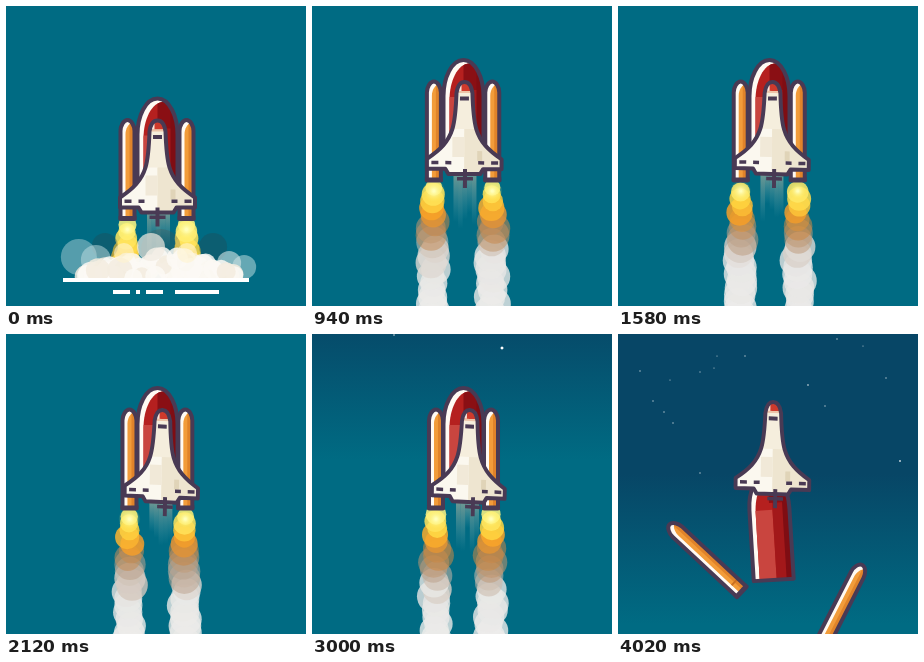
These frames come from a looping animation (300x300 px, 4040 ms). An HTML page with a canvas:

```html
<!DOCTYPE html>
<html lang="en">
<head>
<meta charset="utf-8">
<title>Shuttle launch</title>
<style>
html, body { margin: 0; width: 100%; height: 100%; overflow: hidden; background: #006b83; }
canvas { display: block; width: 100vw; height: 100vh; }
</style>
</head>
<body>
<canvas id="stage" width="300" height="300"></canvas>
<script>
const ctx = document.getElementById('stage').getContext('2d');
const LOOP = 4040, SPLIT = 3170, CUTOFF = 3130;
const INK = '#493a54';

const clamp = (v, a = 0, b = 1) => Math.min(b, Math.max(a, v));
const mix = (a, b, k) => a + (b - a) * k;
const ramp = (t, a, b) => clamp((t - a) / (b - a));
const easeInOut = k => k < .5 ? 2 * k * k : 1 - 2 * (1 - k) * (1 - k);
const rand = n => { const s = Math.sin(n * 127.1 + 11.7) * 43758.5453; return s - Math.floor(s); };

// Motion
const lift = t => 38.5 * (1 - easeInOut(ramp(t, 0, 560)));
const roll = t => Math.pow((1 - Math.cos(Math.PI * Math.max(t, 0) / 2900)) / 2, 1.3);
const groundY = t => 274 + 130 * Math.pow(t / 700, 2);
const nozzleX = (side, t) => side < 0 ? 121.5 + 2.5 * roll(t) : 180.5 - 1.5 * roll(t);

function disc(x, y, r, color, alpha = 1) {
  ctx.globalAlpha = alpha;
  ctx.fillStyle = color;
  ctx.beginPath();
  ctx.arc(x, y, r, 0, 7);
  ctx.fill();
  ctx.globalAlpha = 1;
}

function box(x, y, w, h, color) {
  ctx.fillStyle = color;
  ctx.fillRect(x, y, w, h);
}

// Bands of colour inside an inked outline, with a white rim along the left
function shape(path, bands, rim) {
  ctx.save();
  ctx.clip(path);
  ctx.fillStyle = '#fffaf3';
  ctx.fill(path);
  ctx.translate(rim, rim * .6);
  ctx.beginPath();
  ctx.clip(path);
  ctx.translate(-rim, -rim * .6);
  bands.forEach(b => box(...b));
  ctx.restore();
  // the shifted clip leaves the lower edge to the bands, so ink comes last
  ctx.strokeStyle = INK;
  ctx.lineWidth = 4;
  ctx.lineJoin = 'round';
  ctx.stroke(path);
}

const boosterPath = new Path2D('M-7 99V11C-7 6 -4 0 0 0S7 6 7 11V99Z');
const tankPath = new Path2D('M-20 107V36C-20 18 -12 0 0 0S20 18 20 36V107Z');
const orbiterPath = new Path2D(
  'M0 1C-4 1 -7 5 -8 12C-8.5 27 -9 38 -12 48C-16 61 -24 69 -37.5 78V88H-19L-16 93' +
  'H16L19 88H37.5V78C24 69 16 61 12 48C9 38 8.5 27 8 12C7 5 4 1 0 1Z');

const boosterBands = [
  [-8, 0, 16, 100, '#f29c3a'], [2, 0, 6, 100, '#e0832a'], [-8, 86, 16, 2, '#c96f22']
];
const tankBands = [
  [-21, 0, 42, 110, '#b5201f'], [-21, 37, 24, 73, '#c9453f'],
  [3, 0, 18, 110, '#a3181a'], [0, 0, 21, 30, '#8a0f14'], [13, 0, 8, 110, '#7f0d13']
];
const orbiterBands = [
  [-40, 0, 80, 95, '#f5eedd'], [-40, 48, 40, 47, '#fbf8ef'], [0, 48, 40, 47, '#eee5d0'],
  [-12, 56, 12, 20, '#f1e9d8'], [13, 70, 5, 10, '#e0d4b8'],
  [-9, 0, 18, 10, '#cf3a2c'], [-9, 0, 6, 10, '#fbe6da'], [-9, 10, 18, 2, '#ecc3a8']
];

const STARS = [
  [190, 51, 1.5], [82, 38, .7], [282, 127, 1], [46, 78, .7], [82, 139, .7],
  [35, 67, .7], [22, 37, .7], [127, 22, .7], [96, 34, .6], [219, 5, .7],
  [245, 12, .6], [207, 72, .7], [268, 44, .7], [52, 46, .6], [55, 89, .7], [99, 22, .6]
];

function drawSky(t) {
  const p = 1 - Math.pow(1 - ramp(t, 2700, 4020), 2.2);
  const end = 290 * p;
  const g = ctx.createLinearGradient(0, end - 150, 0, end);
  g.addColorStop(0, '#074666');
  g.addColorStop(1, '#006b83');
  box(0, 0, 300, 300, g);
  const dy = 37 * (Math.pow(ramp(t, 3000, 4020), 1.66) - 1);
  const dim = mix(1, .6, ramp(t, 3000, 4020));
  STARS.forEach(([x, y, r], i) => {
    const a = i < 2 ? ramp(t, 2740, 2950) * dim : ramp(t, 3050, 3500) * .75;
    if (a) disc(x, y + dy, r * (i ? 1 : dim), '#fff', a);
  });
}

// Booster exhaust: puffs cool from yellow through brown to white
const HEAT = [[0, 255, 246, 130], [45, 255, 216, 66], [85, 249, 160, 38], [130, 200, 134, 70],
  [190, 188, 163, 142], [250, 232, 231, 229], [999, 252, 252, 252]];

function heat(age) {
  const i = HEAT.findIndex(h => h[0] > age);
  const a = HEAT[i - 1], b = HEAT[i], k = (age - a[0]) / (b[0] - a[0]);
  return 'rgb(' + [1, 2, 3].map(c => Math.round(mix(a[c], b[c], k))) + ')';
}

function drawExhaust(t) {
  const step = 24, life = 490;
  ctx.save();
  ctx.beginPath();
  ctx.rect(0, 0, 300, Math.min(300, groundY(t)));
  ctx.clip();
  for (let n = Math.ceil((t - life) / step); n * step <= t; n++) {
    const born = n * step, age = t - born;
    if (born > CUTOFF) break;
    for (const side of [-1, 1]) {
      const seed = n * 2 + side * 301;
      const x = nozzleX(side, born) + (rand(seed) - .5) * 6 * Math.min(1, age / 100);
      const y = 180 + lift(born) + age * .285;
      const r = 9 + 6 * Math.min(1, age / 160) + (rand(seed + 7) - .5) * 3;
      const warm = age * mix(.5, 1, ramp(t, 0, 600)) * mix(.85, 1.15, rand(seed + 3));
      disc(x, y, r, heat(warm), warm < 110 ? .85 : warm < 220 ? .55 : .8);
    }
  }
  ctx.restore();
  if (t < CUTOFF) [-1, 1].forEach(side => drawGlow(nozzleX(side, t), 185 + lift(t), t + side * 40));
}

function drawGlow(x, y, t) {
  const r = 10 + 1.5 * Math.sin(t / 45);
  const g = ctx.createRadialGradient(x, y, 1, x, y, r);
  g.addColorStop(0, 'rgba(255,255,190,.95)');
  g.addColorStop(1, 'rgba(255,235,90,0)');
  disc(x, y, r, g);
}

function drawHaze(t) {
  if (t > CUTOFF + 60) return;
  const cx = 152 + 3 * roll(t), top = 168 + lift(t), tick = Math.floor(t / 60);
  for (let i = 0; i < 5; i++) {
    const h = 24 + 32 * rand(i * 9 + tick);
    const g = ctx.createLinearGradient(0, top, 0, top + h);
    g.addColorStop(0, 'rgba(205,190,160,.55)');
    g.addColorStop(1, 'rgba(120,180,190,0)');
    box(cx - 11 + i * 4.6, top, 4.6, h, g);
  }
}

function drawGround(t) {
  const gy = groundY(t), drop = gy - 274, fade = 1 - ramp(t, 450, 800);
  if (!fade) return;
  const spread = 1 + t / 600;
  const puff = (x, y, r, color, a) =>
    disc(155 + (x - 155) * spread, y + drop - t * .012, r * (1 + t / 900), color, a * fade);
  ctx.save();
  ctx.beginPath();
  ctx.rect(0, 0, 300, gy);
  ctx.clip();
  puff(99, 240, 13, '#28424a', .3);
  puff(207, 241, 14, '#28424a', .3);
  puff(155, 243, 20, '#504e4a', .25);
  puff(73, 251, 18, '#a9d0d6', .5);
  puff(90, 254, 15, '#c4dfe2', .5);
  puff(238, 261, 12, '#a9d0d6', .6);
  puff(223, 257, 12, '#d5e6e6', .6);
  for (let i = 0; i < 64; i++) {
    const k = (i * .618) % 1, x = 80 + k * 150;
    const top = 242 + 16 * Math.pow(Math.abs(k - .5) * 2, 2);
    puff(x, mix(top + 9, 272, rand(i + 50)), 8 + 5 * rand(i + 90), i % 3 ? '#fbf9f4' : '#f3ecdf', .85);
  }
  puff(145, 241, 14, '#f1ebe1', .7);
  puff(118, 247, 10, '#fff3cf', .6);
  puff(181, 247, 10, '#fff3cf', .6);
  ctx.restore();
  box(57, gy - 2, 186, 4, '#fff');
  [[107, 17], [130, 4], [140, 17], [169, 44]].forEach(([x, w]) => box(x, gy + 10, w, 4, '#fff'));
}

// Runs draw() around a pivot, rotated in degrees
function placed(x, y, deg, pivot, draw) {
  ctx.save();
  ctx.translate(x, y + pivot);
  ctx.rotate(deg * Math.PI / 180);
  ctx.translate(0, -pivot);
  draw();
  ctx.restore();
}

function drawBooster() {
  shape(boosterPath, boosterBands, 5);
  box(-9, 96, 18, 4, INK);
}

// The roll is a slight squeeze with a shear on both axes
function drawOrbiter(t, r, u) {
  ctx.save();
  ctx.transform(1 - .03 * r, .05 * r, -.02 * r, 1, 151.5 + 6.5 * r, 75 + lift(t) - 8 * Math.pow(u, 4));
  const tail = 5 * r;
  shape(orbiterPath, orbiterBands, 0);
  box(-4.5, 15.5, 9, 4, INK);
  [[-33, 7], [-19, 6], [14, 6], [27, 7]].forEach(([x, w]) => box(x, 80, w, 3.5, INK));
  box(tail - 8, 96, 16, 3.5, INK);
  box(tail - 2, 88, 4, 19, INK);
  ctx.restore();
}

function drawShuttle(t) {
  const r = roll(t), y = lift(t);
  const u = ramp(t, SPLIT, 4020), fall = u * u;
  const drop = Math.pow(ramp(t, 3246, 4020), 2);
  placed(nozzleX(-1, t) - 35 * Math.pow(u, 1.6), 75.5 + y + 99 * fall, -47 * fall, 50, drawBooster);
  placed(nozzleX(1, t) + 42 * fall, 75.5 + y + 150 * fall, 27 * fall, 50, drawBooster);
  placed(151.5 + drop, 54 + y + 85 * drop, -3.5 * drop, 54, () => shape(tankPath, tankBands, 6));
  drawOrbiter(t, r, u);
}

function frame() {
  const t = performance.now() % LOOP;
  drawSky(t);
  drawHaze(t);
  drawExhaust(t);
  drawGround(t);
  drawShuttle(t);
  requestAnimationFrame(frame);
}
frame();
</script>
</body>
</html>
```
